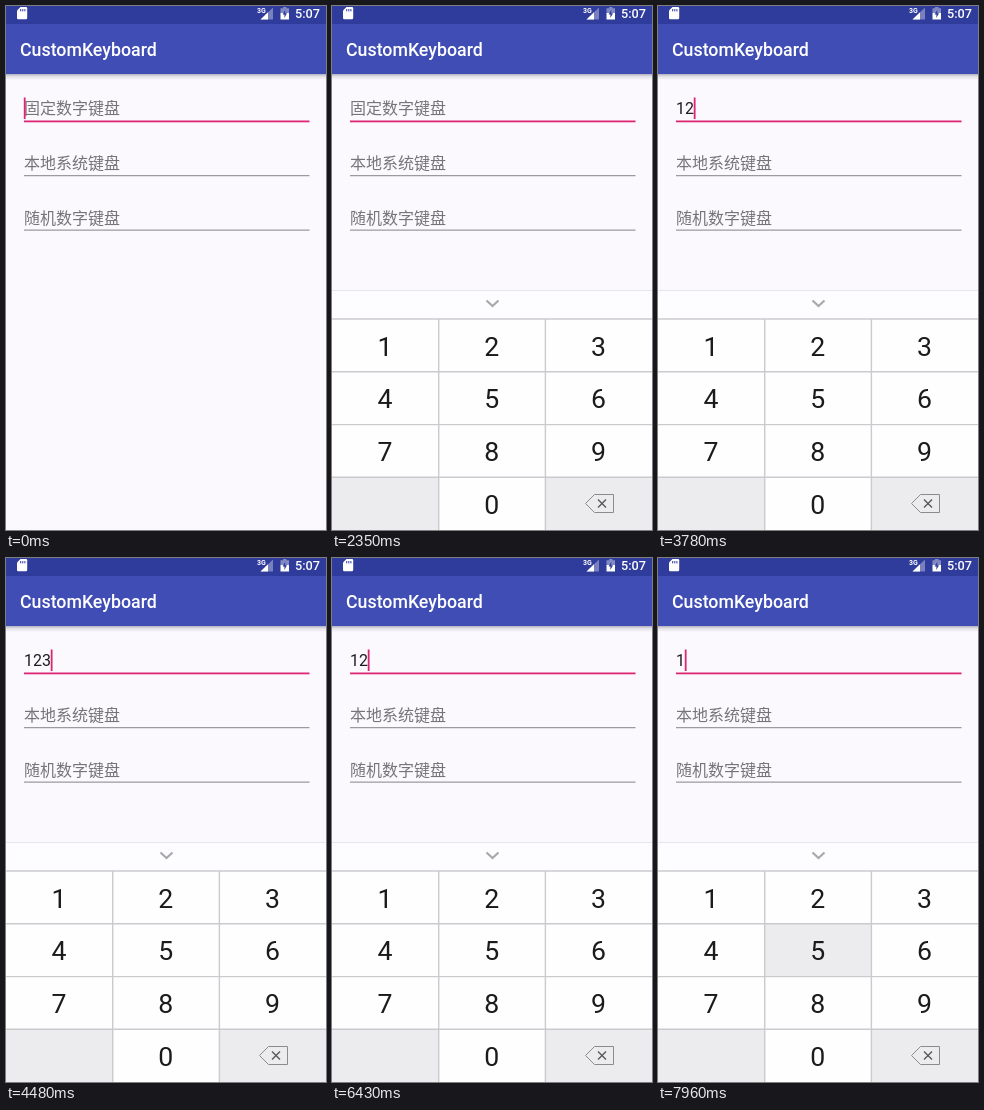
Recreate the animation shown at these times as an HTML page. Size 320 by 524 pixels, loop 8 s.

```html
<!DOCTYPE html>
<html lang="zh">
<head>
<meta charset="utf-8">
<title>Keyboard demo</title>
<style>
  html, body { margin: 0; width: 100%; height: 100%; overflow: hidden; background: #fbf9fd; }
  svg { display: block; width: 100%; height: 100%; font-family: Roboto, sans-serif; }
  .hint { font: 16px "Noto Sans CJK SC", "Noto Sans CJK", sans-serif; fill: #757477; }
  .digit { font-size: 26.67px; text-anchor: middle; fill: #1b1b1d; }
</style>
</head>
<body>
<svg viewBox="0 0 320 524">
  <defs>
    <linearGradient id="shade" x2="0" y2="1">
      <stop stop-color="#202040" stop-opacity=".34"/>
      <stop offset=".4" stop-color="#202040" stop-opacity=".12"/>
      <stop offset="1" stop-color="#202040" stop-opacity="0"/>
    </linearGradient>
  </defs>
  <rect width="320" height="524" fill="#fbf9fd"/>
  <rect y="68" width="320" height="6" fill="url(#shade)"/>
  <rect width="320" height="68" fill="#3f4db4"/>
  <rect width="320" height="18" fill="#303c9c"/>

  <g id="status" fill="#fff">
    <path d="M14.5 1H20q1.200 0 1.200 1.200V12q0 1.200-1.200 1.200H12.200Q11 13.200 11 12V4.500Z"/>
    <path d="M14.700 3v2.400M16.800 3v2.400M18.900 3v2.400" stroke="#303c9c"/>
    <text x="251" y="7" font-size="7" font-weight="700">3G</text>
    <path d="M267 1.500V13.500H254.500Z" opacity=".35"/>
    <path d="M262 6.300V13.500H254.500Z"/>
    <path d="M277 1h3.500v1.300h2.500V7h-8.500V2.300H277Z" opacity=".4"/>
    <path d="M274.500 7h8.500v6.500h-8.500Z"/>
    <path d="M279.300 3.800L276.600 8.600h1.800v3.400L281 7.200h-1.700Z" fill="#303c9c"/>
    <text x="289" y="12.300" font-size="12.700" font-weight="500">5:07</text>
  </g>
  <text x="14" y="50" font-size="17.780" font-weight="500" fill="#fff">CustomKeyboard</text>

  <g id="fields"></g>
  <text id="value" x="18" y="108.300" font-size="16" fill="#1d1d1f"></text>
  <rect id="caret" y="91.500" width="1.800" height="21.500" fill="#dc2673"/>

  <g id="keyboard">
    <rect y="284" width="320" height="240" fill="#fdfcfe"/>
    <path d="M0 284.500H320" stroke="#e6e5e9"/>
    <path d="M154.500 294.500L160.500 300L166.500 294.500" fill="none" stroke="#a9a8ac" stroke-width="2.200"/>
    <g id="keys"></g>
    <path d="M0 313H320M0 365.800H320M0 418.600H320M0 471.300H320M106.700 313V524M213.400 313V524"
      stroke="#cbcace" stroke-width="1.400"/>
    <g fill="none" stroke="#8b8b8e">
      <path d="M253.500 497.500L262.500 488.500H281.500V506.500H262.500Z"/>
      <path d="M266 493.500L274 501.500M274 493.500L266 501.500" stroke="#59595c" stroke-width="1.400"/>
    </g>
  </g>
</svg>
<script>
const LOOP = 8000, BLINK = 500;
const RISE = { start: 1950, length: 250, distance: 240 };
const KEY = { top: 313, width: 106.7, height: 52.75 };
const DIGIT_WIDTH = 8.98;

// [time, field text]; every edit restarts the caret blink
const edits = [
  [-300, ''], [3370, '1'], [3730, '12'], [4090, '123'], [4810, '1235'],
  [5920, '123'], [6300, '12'], [6720, '1']
];
// [key, down, up]
const presses = [
  ['1', 3260, 3370], ['2', 3630, 3730], ['3', 3990, 4090],
  ['5', 4700, 4810], ['5', 7920, LOOP]
];

const byId = id => document.getElementById(id);
function add(parent, tag, attrs, text = '') {
  const node = document.createElementNS('http://www.w3.org/2000/svg', tag);
  for (const name in attrs) node.setAttribute(name, attrs[name]);
  node.textContent = text;
  return parent.appendChild(node);
}

const hints = ['固定数字键盘', '本地系统键盘', '随机数字键盘'].map((label, i) => {
  const y = 108.3 + i * 54.6, active = i === 0;
  add(byId('fields'), 'rect', {
    x: 18, y: active ? 114.5 : 114.8 + i * 54.4, width: 285.5,
    height: active ? 1.8 : 1, fill: active ? '#dc2673' : '#858388'
  });
  return add(byId('fields'), 'text', { x: 18, y, class: 'hint' }, label);
});

const keyRects = {};
[...'123456789', '', '0', 'delete'].forEach((name, i) => {
  const x = i % 3 * KEY.width, y = KEY.top + Math.floor(i / 3) * KEY.height;
  const isDigit = name.length === 1;
  const rect = add(byId('keys'), 'rect', {
    x, y, width: KEY.width, height: KEY.height, fill: isDigit ? '#fefefe' : '#ececee'
  });
  if (!isDigit) return;
  keyRects[name] = rect;
  add(byId('keys'), 'text', { x: x + KEY.width / 2 - .3, y: y + 36.6, class: 'digit' }, name);
});

function render(t) {
  const [since, text] = edits.filter(edit => edit[0] <= t).pop();
  byId('value').textContent = text;
  hints[0].style.visibility = text ? 'hidden' : 'visible';
  byId('caret').setAttribute('x', 17.8 + text.length * DIGIT_WIDTH);
  byId('caret').style.visibility = (t - since) % (2 * BLINK) < BLINK ? 'visible' : 'hidden';

  const p = Math.min(1, Math.max(0, (t - RISE.start) / RISE.length));
  byId('keyboard').setAttribute('transform', `translate(0 ${RISE.distance * (1 - p) ** 2})`);

  for (const name in keyRects) {
    const down = presses.some(([key, from, to]) => key === name && t >= from && t < to);
    keyRects[name].setAttribute('fill', down ? '#ececee' : '#fefefe');
  }
}

const start = performance.now();
function tick() {
  render((performance.now() - start) % LOOP);
  requestAnimationFrame(tick);
}
tick();
</script>
</body>
</html>
```
